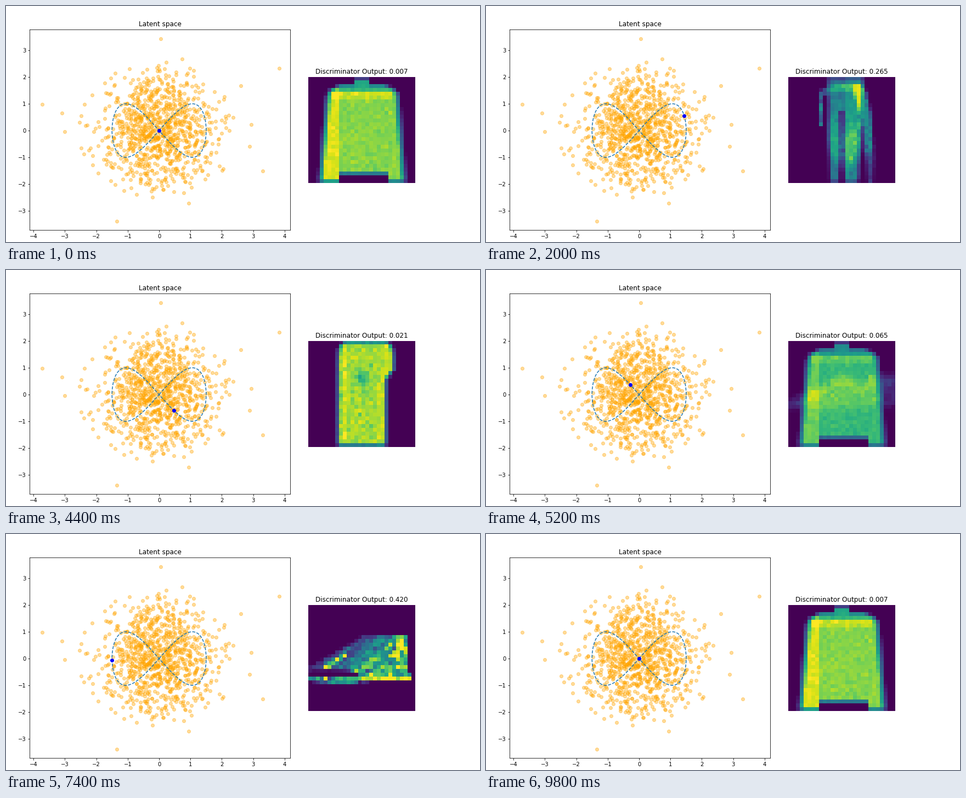
A matplotlib script that plays this animation: 864 by 432 pixels, repeating every 10 s.

```python
import numpy as np
import matplotlib.pyplot as plt
from matplotlib.animation import FuncAnimation

W, H, DPI = 864, 432, 72
FRAMES, STEP = 50, 200
N = 28
Y, X = np.mgrid[:N, :N] + .5


# ---- garment pictures: brightness fields on a 28 x 28 grid ----

def ramp(d, width=1):
    """Rise from 0 to 1 over the given width, centred on d = 0."""
    return np.clip(d / width + .5, 0, 1)


def between(a, lo, hi, edge=1):
    return ramp(a - lo, edge) * ramp(hi - a, edge)


def bump(a, centre, width):
    return np.exp(-((a - centre) / width) ** 2)


def layers(*parts):
    return np.maximum.reduce(parts)


def grain(img, amount, seed):
    noise = np.random.default_rng(seed).normal(size=img.shape)
    return np.clip(img * (1 + amount * noise), 0, 1)


def sweater():
    shoulder = 4 * np.exp(-(Y - 2) / .9)
    left, right = 5.6 - .09 * Y + shoulder, 22.9 + .08 * Y - shoulder
    hem = np.where(abs(X - 14.3) > 6.5, 27.6, 25.5)
    shade = (.82 + .13 * between(X, left, 8) + .12 * between(Y, 4, 5.7)
             - .15 * between(Y, 2, 4))
    body = shade * between(X, left, right, 2) * between(Y, 2.3, hem)
    collar = .6 * between(X, 12, 16) * between(Y, .7, 3)
    return grain(layers(body, collar), .03, 1)


def strap_top():
    inside = ramp(1 - np.hypot((X - 15) / 4.6, (Y - 14.5) / 9.5), .4)
    torso = inside * (.18 + .36 * bump(Y, 18, 5))
    middle = 17.8 + 3.9 * (1 - np.exp(-(Y - 2) / 9))
    strap = (between(X, middle - 1.7 + .04 * Y, middle + 1.8 - .04 * Y)
             * (.96 - .65 * ramp(Y - 21, 8)) * ramp(Y - 2))
    sleeve = .7 * between(X, 8, 9) * between(Y, 4, 13)
    arch = 2 + .05 * (X - 14) ** 2
    yoke = .55 * between(X, 8.5, 18) * between(Y, arch, arch + 1.8)
    return grain(layers(torso, strap, sleeve, yoke), .2, 2)


def trousers():
    left = .77 * between(X, 10.4 + .02 * Y, 13)
    right = .95 * between(X, 15, 19.6 - .05 * Y)
    waist = .72 * between(X, 11, 15) * between(Y, 0, 9)
    seam = .1 * between(X, 13, 15)
    return grain(layers(left, right, waist, seam) * between(Y, .4, 27.6),
                 .07, 3)


def dress():
    corner = 2 * np.exp(-Y)
    left = 7.9 + corner
    right = 22.2 - 2 * ramp(Y - 9, 3) - corner
    shade = (.85 + .1 * between(X, left, 10) + .09 * between(X, right - 2, right)
             - .3 * bump(np.hypot(X - 14, Y - 10), 0, 1.6))
    return grain(shade * between(X, left, right, 1.6) * between(Y, .4, 27.5),
                 .05, 4)


def trainer():
    top = np.maximum(16 - .55 * X, 8.7) + 2 * bump(X, 19, 2)
    sole = 17.8 + 1.2 * bump(X, 11, 5)
    shade = (.5 + .42 * bump(Y, top + 2.4, 1.3)
             - .12 * bump(X, 18, 2) - .2 * ramp(Y - 17, 2))
    return grain(shade * between(Y, top, sole, 2), .22, 5)


def heel_shoe():
    top = np.maximum(17 - .6 * X, 8.3)
    shade = (.25 + .4 * ramp(X + Y - 28, 8) + .25 * bump(X, 24.3, 1)
             + .6 * bump(Y, 19.2 - .6 * X, .8) * between(X, 4, 10))
    upper = shade * between(Y, top, 18) * (1 - .8 * ramp(Y - 17) * ramp(11 - X))
    upper = upper * ramp(26 - X)
    sole = between(X, 0, 27) * between(Y, 19, 20) * (.65 + .25 * ramp(X - 14))
    welt = .65 * between(X, 13, 27) * between(Y, 18, 19)
    tread = .45 * between(X, 3, 14, 5) * between(Y, 20, 21)
    return grain(layers(upper, sole, welt, tread), .25, 6)


KEYS = [(0, sweater(), .007), (6, strap_top(), .428), (14, trousers(), .103),
        (22, dress(), .021), (24.5, sweater(), .007), (30, trainer(), .325),
        (37, heel_shoe(), .420), (49, sweater(), .007)]


def generated(i):
    """Picture and score on the walk at step i."""
    for (a, img0, s0), (b, img1, s1) in zip(KEYS, KEYS[1:]):
        if i <= b:
            u = (i - a) / (b - a)
            u = u * u * (3 - 2 * u)
            return img0 + u * (img1 - img0), s0 + u * (s1 - s0)


# ---- latent space ----

OUTLIERS = [(-3.73, .98), (-3.1, .65), (-3, -.04), (-1.34, -3.38),
            (.05, 3.43), (.94, -2.71), (.73, 2.67), (2.6, 1.67),
            (3.82, 2.33), (3.3, -1.51), (2.93, .22), (2.88, -.6)]


def cloud():
    core = np.random.default_rng(12).normal(size=(1200, 2))
    core = core[np.hypot(*core.T) < 2.6]
    return np.vstack([OUTLIERS, core[:1000 - len(OUTLIERS)]])


def walk(t):
    return 1.5 * np.sin(t), np.sin(2 * t)


fig = plt.figure(figsize=(W / DPI, H / DPI), dpi=DPI, facecolor="white")

ax = fig.add_axes([.05, .05, .55, .85])
ax.set_title("Latent space")
ax.scatter(*cloud().T, color="orange", alpha=.4)
ax.plot(*walk(np.linspace(0, 2 * np.pi, 200)), "--", color="C0")
dot, = ax.plot([0], [0], "o", color="blue", zorder=5)
ax.set_xlim(-4.122, 4.183)
ax.set_ylim(-3.722, 3.771)

side = 194.5
view = fig.add_axes([551.1 / W, (H - 226.8 - side / 2) / H, side / W, side / H])
view.axis("off")
picture = view.imshow(KEYS[0][1], cmap="viridis", vmin=0, vmax=1,
                      interpolation="nearest", aspect="auto")
label = view.set_title("")


def update(i):
    x, y = walk(2 * np.pi * i / (FRAMES - 1))
    dot.set_data([x], [y])
    img, score = generated(i)
    picture.set_data(img)
    label.set_text(f"Discriminator Output: {score:.3f}")
    return dot, picture, label


anim = FuncAnimation(fig, update, frames=FRAMES, interval=STEP,
                     repeat=True, repeat_delay=0)
plt.show()
```
